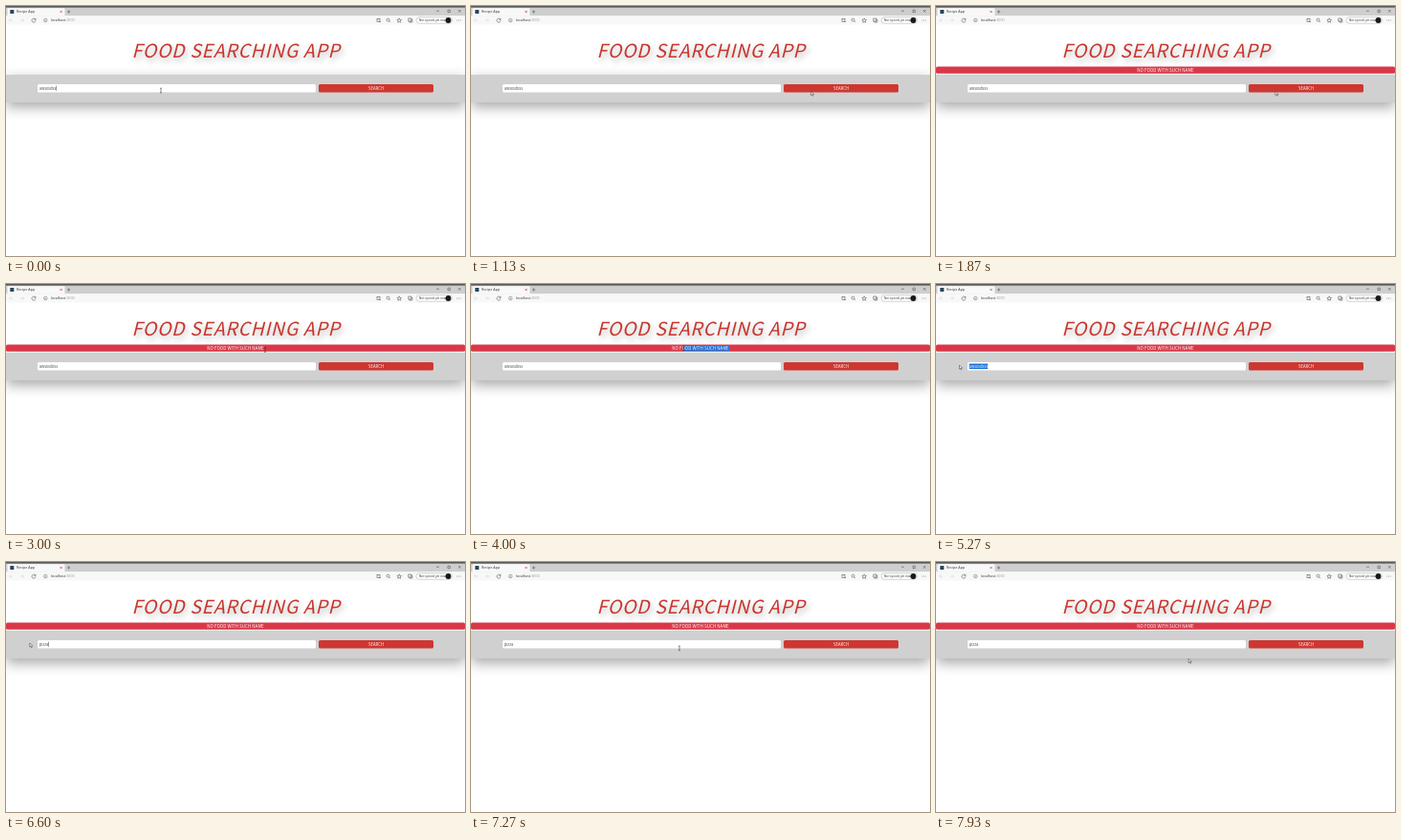
Recreate the animation shown at these times as an HTML page. Size 480 by 262 pixels, loop 8000 ms.

```html
<!DOCTYPE html>
<html lang="en">
<head>
<meta charset="utf-8">
<title>Recipe App</title>
<style>
  html, body { margin: 0; width: 100%; height: 100%; overflow: hidden; background: #fff; }
  .stage { position: relative; width: 480px; height: 262px; overflow: hidden; background: #fff; }
  .panel {
    position: absolute; left: 0; top: 71.5px; width: 480px; height: 29px;
    background: #d0d0d0; box-shadow: 0 5px 14px rgba(0, 0, 0, .35);
  }
  svg { position: absolute; left: 0; top: 0; }
  text { font-family: "Noto Sans CJK JP", "Noto Sans CJK SC", "Open Sans", sans-serif; white-space: pre; }
  .bar text { font-family: "Open Sans", "Noto Sans", sans-serif; font-size: 3.7px; fill: #333; }
  .icon { fill: none; stroke: #555; stroke-width: .6; }
  .title {
    font-size: 19.5px; font-weight: 500; font-style: italic; letter-spacing: .7px;
    fill: #c9352d; text-shadow: 2px 4px 6px rgba(0, 0, 0, .28);
  }
  .label { font-size: 4.2px; fill: #fff; }
  .notice { font-size: 4.6px; font-weight: 500; fill: #fff; }
  .typed { font-size: 4px; fill: #555; }
  .mid { text-anchor: middle; }
</style>
</head>
<body>
<div class="stage">
  <div class="panel"></div>
  <svg width="480" height="262" viewBox="0 0 480 262">
    <g class="bar">
      <rect width="480" height="10.5" fill="#cecece"/>
      <rect width="480" height="1.6" fill="#595959"/>
      <rect y="10.2" width="480" height="9.3" fill="#f8f8f8"/>
      <path d="M1.5 10.5V3.2q0-1 1-1H60.5q1 0 1 1V10.5z" fill="#f8f8f8"/>
      <rect x="4.3" y="4" width="4" height="4" fill="#25465f"/>
      <text x="11" y="7.2">Recipe App</text>
      <path class="icon" d="M56.5 4.9l2.2 2.2m0-2.2l-2.2 2.2" style="stroke:#b33"/>
      <path class="icon" d="M64 6h3.2m-1.6-1.6v3.2"/>
      <path class="icon" d="M450 5.2h3M462 4.2h2.4v2.4h-2.4zM473 4l2.6 2.6m0-2.6L473 6.600"/>
      <path class="icon" d="M7 15H3.500l1.500-1.500m-1.500 1.500l1.500 1.500M15 15h3.500l-1.500-1.500m1.500 1.500l-1.500 1.500" style="stroke:#d5d5d5"/>
      <path class="icon" d="M30.700 14A2 2 0 1 0 31 15.500M31 12.800v1.500h-1.500"/>
      <circle class="icon" cx="41.300" cy="15" r="1.800" style="stroke-width:.45"/>
      <path class="icon" d="M41.300 14.800v1.200m0-2.200v.3"/>
      <text x="46.800" y="16.400">localhost<tspan fill="#999">:3000</tspan></text>
      <rect class="icon" x="388" y="13.300" width="3" height="3"/>
      <path class="icon" d="M390.500 15.800l1.500 1.200"/>
      <circle class="icon" cx="399.500" cy="14.600" r="1.500"/>
      <path class="icon" d="M400.600 15.700l1.300 1.300"/>
      <path class="icon" d="M411.200 12.800l.7 1.500 1.600.2-1.200 1.100.3 1.600-1.400-.8-1.400.8.3-1.600-1.200-1.100 1.600-.2z"/>
      <path class="icon" d="M420.800 13h3v3h-3zM421.800 16v1h3v-3h-1"/>
      <rect x="429" y="11.700" width="37.500" height="6.500" rx="3.250" fill="#fff" stroke="#aaa" stroke-width=".5"/>
      <text x="432" y="16.100" style="font-size:3.100px">Not synced yet now</text>
      <circle cx="462.500" cy="15" r="2.900" fill="#181818"/>
      <path d="M471.500 15h.7m1 0h.7m1 0h.7" stroke="#555" stroke-width=".7"/>
    </g>

    <text class="title mid" x="240.500" y="53.500">FOOD SEARCHING APP</text>

    <g id="notice">
      <rect y="63.500" width="480" height="7.300" rx="1.500" fill="#d93848"/>
      <rect id="mark" y="64.300" height="5.700" fill="#1b6fd6"/>
      <text class="notice mid" x="240" y="68.900">NO FOOD WITH SUCH NAME</text>
    </g>

    <rect x="33" y="82" width="291" height="8.500" rx="1.500" fill="#fff"/>
    <rect id="pick" y="83.500" height="5.500" fill="#1b6fd6"/>
    <text id="typed" class="typed" x="34.700" y="87.500"></text>
    <rect id="caret" y="83.600" width=".5" height="5.200" fill="#333"/>
    <rect x="327" y="82" width="120" height="8.500" rx="1.500" fill="#cd3730"/>
    <text class="label mid" x="387" y="87.700">SEARCH</text>

    <path id="beam" d="M-1-2.300h.7q.3 0 .3.300q0-.3.300-.3h.7M0-2v4M-1 2.300h.7q.3 0 .3-.3q0 .3.300.3h.7" fill="none" stroke="#222" stroke-width=".5"/>
    <path id="arrow" d="M0 0v4l1-.8.7 1.600.7-.3-.7-1.500h1.300z" fill="#fff" stroke="#222" stroke-width=".45"/>
  </svg>
</div>
<script>
  const LOOP = 8000;
  const TEXT_X = 34.7;
  const NOTICE = [210, 270];
  const $ = id => document.getElementById(id);
  const notice = $('notice'), mark = $('mark'), pick = $('pick');
  const typed = $('typed'), caret = $('caret'), beam = $('beam'), arrow = $('arrow');

  // Pointer path: time, x, y
  const path = [
    [0, 162, 88.5], [270, 162, 88.5], [560, 225, 101], [800, 302, 106], [1070, 355.5, 89.5],
    [1600, 355.5, 89.5], [1670, 355, 89.5], [1870, 355, 89.5], [2300, 318, 78], [2670, 272, 69],
    [3000, 271, 69], [3330, 271, 69], [4130, 213, 67], [4230, 208, 67], [4730, 107, 85],
    [5000, 56, 86.5], [5070, 50, 86.5], [5270, 24.5, 85], [6600, 24.5, 85],
    [7000, 140, 89], [7400, 255, 91], [7600, 262, 89], [7800, 263, 92], [7930, 264.2, 101.5], [LOOP, 264.2, 101.5]
  ];

  // Field content: start time, text
  const entries = [
    [0, 'awsxsdxs'], [270, 'awsxsdxss'], [5930, 'p'], [6070, 'pi'],
    [6200, 'piz'], [6400, 'pizz'], [6600, 'pizza']
  ];

  const between = (t, a, b) => t >= a && t < b;
  const show = (el, on) => el.setAttribute('visibility', on ? 'visible' : 'hidden');
  const place = (el, x, y) => el.setAttribute('transform', `translate(${x} ${y})`);

  function span(el, from, to) {
    el.setAttribute('x', from);
    el.setAttribute('width', Math.max(0, to - from));
  }

  function pointerAt(t) {
    const i = path.findIndex(p => p[0] > t);
    const [t0, x0, y0] = path[i - 1], [t1, x1, y1] = path[i];
    const k = (t - t0) / (t1 - t0);
    return [x0 + (x1 - x0) * k, y0 + (y1 - y0) * k];
  }

  function draw(t) {
    const [x, y] = pointerAt(t);
    const inField = x > 33 && x < 324 && y > 82 && y < 90.5;
    const onNotice = between(t, 2500, 4300) && y < 71;
    const useBeam = inField || onNotice;
    show(beam, useBeam);
    show(arrow, !useBeam);
    place(useBeam ? beam : arrow, x, y);

    const text = entries.filter(e => e[0] <= t).pop()[1];
    if (typed.textContent !== text) typed.textContent = text;
    const end = TEXT_X + typed.getComputedTextLength();
    caret.setAttribute('x', end + .2);
    show(caret, t < 270 || between(t, 5930, 7000));

    const picking = between(t, 5000, 5930);
    span(pick, picking ? Math.max(TEXT_X, x) : end, end);
    pick.setAttribute('fill', t < 5600 ? '#1b6fd6' : '#c8c8c8');
    typed.style.fill = between(t, 5070, 5600) ? '#fff' : '';

    notice.setAttribute('display', t < 1870 ? 'none' : 'inline');
    const marked = between(t, 3330, 5000);
    const left = t > 4130 ? NOTICE[0] : Math.max(NOTICE[0], x);
    span(mark, marked ? left : NOTICE[1], NOTICE[1]);
  }

  function tick() {
    draw(performance.now() % LOOP);
    requestAnimationFrame(tick);
  }
  tick();
</script>
</body>
</html>
```
